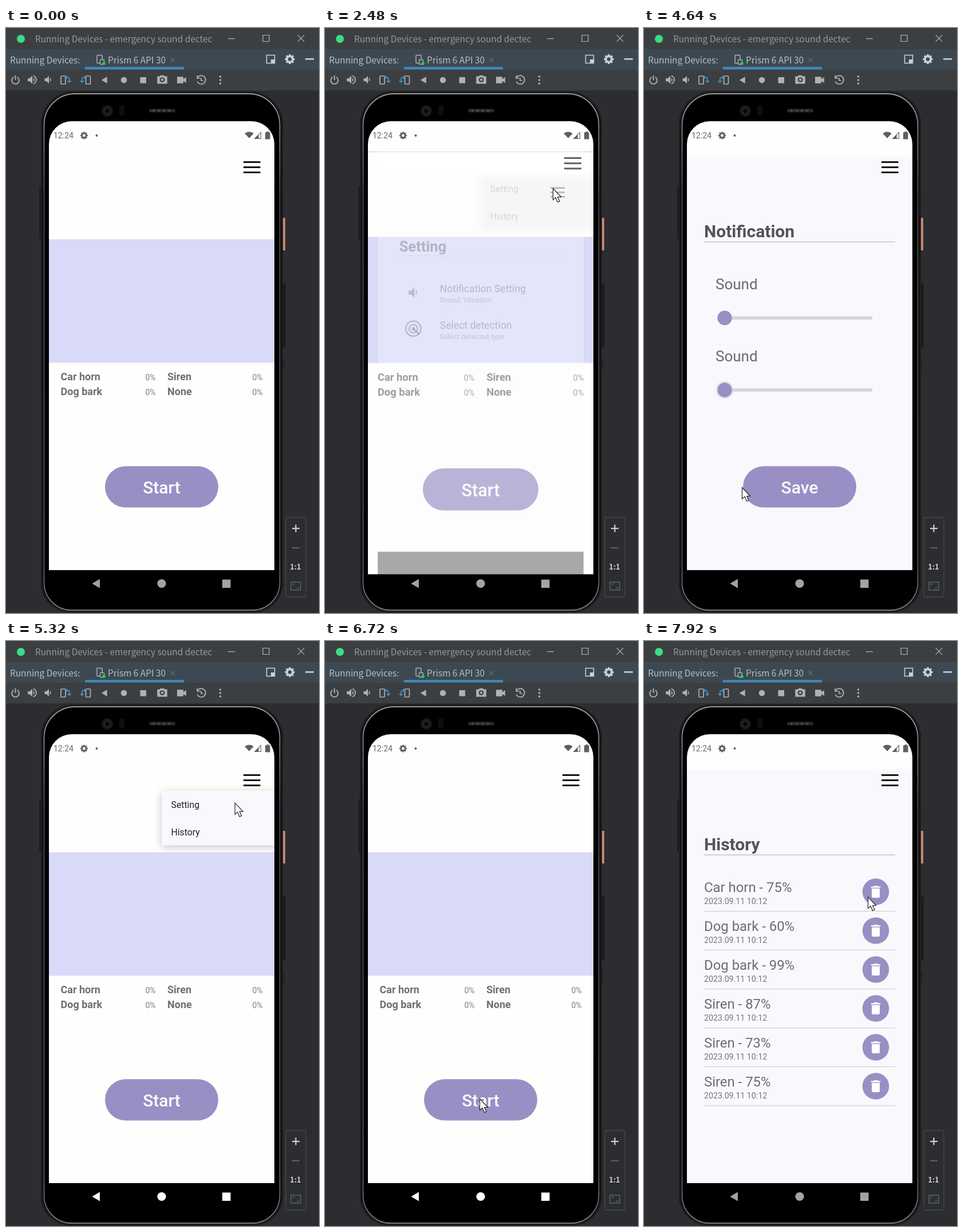
Write an HTML page with a canvas that moves like this. It is 547 by 1023 pixels and loops after 8 s.

```html
<!DOCTYPE html>
<html lang="en">
<head>
<meta charset="utf-8">
<title>Emulator demo</title>
<style>
html, body { margin: 0; width: 100%; height: 100%; overflow: hidden; background: #2b2d30; }
canvas { display: block; }
</style>
</head>
<body>
<canvas id="stage" width="547" height="1023"></canvas>
<script>
const g = document.getElementById('stage').getContext('2d');
const LOOP = 8000, STEP = 40, MORPH = 220;
const PURPLE = '#9a8fc4', ICON = '#afb1b3', BLUE = '#3c95c8', PAGE = '#faf8fc';
const UI = '"Noto Sans CJK KR", "Noto Sans CJK JP", "Noto Sans", sans-serif';
const APP = 'Roboto, sans-serif';
const clamp = v => Math.max(0, Math.min(1, v));
let now = 0, mouse = null;

// Drawing helpers
function rect(x, y, w, h, color) { g.fillStyle = color; g.fillRect(x, y, w, h); }
function round(x, y, w, h, r, fill, line, width = 1) {
  g.beginPath();
  g.roundRect(x, y, w, h, r);
  if (fill) { g.fillStyle = fill; g.fill(); }
  if (line) { g.strokeStyle = line; g.lineWidth = width; g.stroke(); }
}
function disc(x, y, r, fill, line, width = 1) {
  round(x - r, y - r, 2 * r, 2 * r, r, fill, line, width);
}
function text(s, x, y, size, color, weight = 400, family = APP, align = 'left') {
  g.font = `${weight} ${size}px ${family}`;
  g.textAlign = align;
  g.fillStyle = color;
  g.fillText(s, x, y);
}
// Icon paths live on a 24 unit grid centred on x, y.
function icon(d, x, y, size, color, width) {
  g.save();
  g.translate(x - size / 2, y - size / 2);
  g.scale(size / 24, size / 24);
  const path = new Path2D(d);
  if (width) { g.strokeStyle = color; g.lineWidth = width; g.stroke(path); }
  else { g.fillStyle = color; g.fill(path, 'evenodd'); }
  g.restore();
}
function fade(alpha, draw) {
  g.save();
  g.globalAlpha *= alpha;
  draw();
  g.restore();
}
function zoom(s, cy, draw) {
  g.save();
  g.translate(272, cy);
  g.scale(s, s);
  g.translate(-272, -cy);
  draw();
  g.restore();
}
function gear(x, y, r, color) {
  disc(x, y, r * .58, null, color, r * .42);
  g.lineWidth = r * .42;
  g.beginPath();
  for (let i = 0; i < 8; i++) {
    const c = Math.cos(i * Math.PI / 4), s = Math.sin(i * Math.PI / 4);
    g.moveTo(x + c * r * .7, y + s * r * .7);
    g.lineTo(x + c * r, y + s * r);
  }
  g.stroke();
}

const SPEAKER = 'M3 9v6h4l5 5V4L7 9z';
const WAVE = 'M14 8v8a4.5 4.5 0 0 0 0-8z';
const WAVE2 = 'M14 3.2v2.1a7 7 0 0 1 0 13.4v2.1a9 9 0 0 0 0-17.6z';
const BIN = 'M6 19a2 2 0 0 0 2 2h8a2 2 0 0 0 2-2V7H6zM19 4h-3.5l-1-1h-5l-1 1H5v2h14z';
const CROSS = 'M2 2 22 22M22 2 2 22';
const BACK = 'M20 2v20L3 12z';

// Desktop window around the phone
function windowFrame() {
  rect(0, 0, 547, 1023, '#2b2d30');
  rect(0, 0, 547, 109, '#3c3f41');
  rect(0, 37, 547, 36, '#3d4952');
  disc(26, 19, 7, '#3ddc84');
  text('Running Devices - emergency sound dectect', 51, 25, 15.4, '#96999b', 400, UI);
  rect(361, 5, 20, 30, '#3c3f41');
  rect(388, 18, 12, 1.2, '#b4b6b8');
  round(449, 12.5, 11, 11, 0, null, '#b4b6b8', 1.2);
  icon(CROSS, 515.5, 18, 14, '#b4b6b8', 2);

  text('Running Devices:', 7, 62, 15.4, '#bcbec0', 400, UI);
  rect(138, 68, 173, 4.5, '#4088b5');
  round(159, 47.5, 9, 14, 1, null, ICON, 1.5);
  round(164.5, 55.5, 7, 8, 1, '#3d4952', ICON, 1.3);
  disc(171, 62, 2.8, '#21d04b');
  text('Prism 6 API 30', 178, 62, 15.4, '#bcbec0', 400, UI);
  icon(CROSS, 291, 56, 9, '#74797d', 2.8);
  round(455.5, 47.5, 14, 14, 0, null, '#ced0d2', 1.6);
  rect(463, 55, 6, 6, '#ced0d2');
  gear(496, 54.5, 8.5, '#ced0d2');
  rect(523, 53, 15, 2.6, '#ced0d2');

  icon('M7.5 5.5a8.5 8.5 0 1 0 9 0M12 1v11', 16.5, 91, 18, ICON, 2.5);
  icon(SPEAKER + WAVE + WAVE2, 46, 90.5, 21, ICON);
  icon(SPEAKER + WAVE, 75, 90.5, 20, ICON);
  for (const [x, flip] of [[105, 1], [138.5, -1]]) {
    g.save();
    g.translate(x, 91);
    g.scale(flip, 1);
    round(-9, -7, 8, 14, 1, null, ICON, 1.7);
    icon('M4 4h5q6 0 6 6v9M10 14l5 5 5-5M8 0 4 4l4 4', 4, 0, 14, BLUE, 2.8);
    g.restore();
  }
  icon(BACK, 172, 91, 14, ICON);
  disc(206, 91, 5.3, ICON);
  rect(234.5, 86, 10.5, 10.5, ICON);
  icon('M9 3 7 5H2v15h20V5h-5l-2-2zM12 7a5 5 0 1 0 .1 0zM12 9.5a2.5 2.5 0 1 0 .1 0z', 273, 90.5, 21, ICON);
  icon('M3 5h13v5l6-4v12l-6-4v5H3z', 306.5, 91, 20, ICON);
  icon('M4 6a10 10 0 1 1-1 9M3 1v7h7M12 7v6h5', 341, 91, 18, ICON, 2.3);
  for (const y of [85, 91, 97]) disc(374.5, y, 1.8, ICON);

  round(489, 856, 35, 139, 3, '#2b2d30', '#45484a', 1.3);
  rect(500, 874, 13, 2.2, '#ced0d2');
  rect(505.4, 868.5, 2.2, 13, '#ced0d2');
  rect(500, 908, 13, 2, '#606366');
  text('1:1', 506, 947, 13, '#ced0d2', 700, UI, 'center');
  round(498, 969, 17, 14, 0, null, '#606366', 1.5);
  icon('M3 10V4h7M21 14v6h-7', 506.5, 976, 12, '#606366', 2.4);
}

function phoneBody() {
  rect(58, 277, 3, 92, '#1d1e20');
  rect(484, 332, 4, 57, '#c98472');
  rect(484.5, 446, 4, 112, '#191a1b');
  rect(484.5, 580, 2, 18, '#202123');
  const shine = g.createLinearGradient(0, 112, 0, 1020);
  shine.addColorStop(0, '#9a9b9d');
  shine.addColorStop(.1, '#707173');
  shine.addColorStop(.2, '#48494b');
  shine.addColorStop(.9, '#505153');
  shine.addColorStop(1, '#77787a');
  round(61, 111, 423, 911, [58, 58, 52, 52], '#050506');
  round(62.5, 112.5, 420, 908, [57, 57, 51, 51], null, '#1e1f21', 2.5);
  round(66.5, 115, 412, 903, [54, 54, 48, 48], '#000', shine, 2);
  disc(177, 145, 10, '#17181a');
  disc(177, 145, 5, '#08080a', '#2e2f32', 1.5);
  round(198, 135, 9, 18, 3, '#0e0e10');
  round(250, 141.5, 46, 6, 3, '#2a2a2c');
  for (let x = 258; x < 294; x += 9) disc(x, 144.5, 2, '#4a4a4c');
}

// App screens
function button(label, y = 766.2, h = 72.3) {
  round(173, y, 198, h, h / 2, PURPLE);
  text(label, 272, y + h / 2 + 11.5, 30, '#fff', 500, APP, 'center');
}
function heading(s, y = 374) {
  text(s, 105, y - 8.5, 30, '#555356', 700);
  rect(105, y - .7, 334, 1.4, '#c3c1c5');
}
function home() {
  rect(75, 369.5, 394, 216, '#d9daf8');
  ['Car horn', 'Siren', 'Dog bark', 'None'].forEach((name, i) => {
    const col = i % 2, y = 616 + (i >> 1) * 26;
    text(name, col ? 282 : 95.5, y, 18, '#6f6f70', 700);
    text('0%', col ? 448.5 : 261.5, y, 14, '#828283', 400, APP, 'right');
  });
  button('Start');
}
function setting() {
  heading('Setting');
  icon(SPEAKER + WAVE, 136, 449, 32, '#6f6d72');
  disc(134, 523, 15.5, null, '#6f6d72', 3);
  disc(134, 523, 8.5, null, '#6f6d72', 3);
  disc(134, 523, 3.5, '#6f6d72');
  icon('M12 12l9 9', 134, 523, 32, '#6f6d72', 2.4);
  text('Notification Setting', 188.5, 448, 20.6, '#636165');
  text('Sound, Vibration', 188.5, 469, 14.6, '#858388');
  text('Select detection', 188.5, 523, 20.6, '#636165');
  text('Select detected type', 188.5, 544, 14.6, '#858388');
}
function notification() {
  heading('Notification');
  for (const [y, from, to] of [[507, 3640, 4040], [633, 4180, 4480]]) {
    const held = now >= from && now <= to;
    const x = held ? Math.max(141, Math.min(387, mouse[0])) : 141;
    text('Sound', 125, y - 50, 26, '#6b696d');
    rect(141, y - 2.8, 258, 5.6, '#d7d5d9');
    rect(141, y - 2.8, x - 141, 5.6, PURPLE);
    if (now >= from) fade(clamp(1 - (now - to) / 320), () => disc(x, y, 15.5, '#d4d1da'));
    disc(x, y, 12.7, PURPLE);
  }
  button('Save');
}
function detection() {
  heading('Detecting type', 371.5);
  ['Car horn', 'Dog bark', 'Siren'].forEach((name, i) => {
    const y = 454 + i * 70.5;
    text(name, 125, y + 11, 27.7, '#565458');
    if (i < 2 || now < 6080) {
      round(390, y - 12.8, 25, 25, 2, null, PURPLE, 2.8);
      return;
    }
    fade(clamp((6360 - now) / 160), () => disc(403, y, 30, '#e0ebe9'));
    round(390, y - 12.8, 25, 25, 2, PURPLE);
    if (now < 6200) disc(402.5, y, 1.4, '#fff');
    else icon('M3 12l6 6L21 6', 402.5, y, 21, '#fff', 3);
  });
  button('Save', 771, 70);
}
function history() {
  heading('History');
  ['Car horn - 75%', 'Dog bark - 60%', 'Dog bark - 99%', 'Siren - 87%', 'Siren - 73%', 'Siren - 75%'].forEach((name, i) => {
    const y = 438.5 + i * 68;
    text(name, 105, y, 23.9, '#6f6d71');
    text('2023.09.11 10:12', 105, y + 21.5, 14.2, '#77757a');
    rect(105, y + 33.4, 334, 1.3, '#d3d1d5');
    disc(405, y, 23.3, PURPLE);
    icon(BIN, 405, y, 28, '#fff');
  });
}

function layer(page, back, front = back, cy = 579.5) {
  zoom(back, 579.5, () => {
    rect(75, 163, 394, 61, '#fffefd');
    rect(75, 224, 394, 724, page === home ? '#fffefd' : PAGE);
    rect(75, 948, 394, 48, '#000');
  });
  zoom(front, cy, () => {
    page();
    for (const y of [233, 242, 251]) rect(415, y, 29.5, 3, '#151515');
  });
}

// Start time, screen below, screen above, whether the upper one closes
const morphs = [
  [2420, home, setting], [3080, setting, notification], [4800, home, notification, true],
  [5400, home, setting], [5680, setting, detection], [6340, home, detection, true],
  [7420, home, history]
];
function screens() {
  const last = morphs.filter(m => m[0] <= now).pop();
  if (!last) return layer(home, 1);
  const [start, below, above, closing] = last;
  const p = clamp((now - start) / MORPH), open = closing ? 1 - p : p;
  if (open < 1) layer(below, 1 + .075 * open);
  if (open > 0) fade(clamp(1.25 * open), () => layer(above, .88 + .12 * open, .797 + .203 * open, 541));
}

function popup() {
  for (const [from, to] of [[1440, 2495], [5180, 5460], [6960, 7480]]) {
    if (now < from || now >= to) continue;
    const out = clamp((to - now) / 100);
    fade(clamp((now - from + 40) / 120) * out, () => {
      g.translate(0, -6 * (1 - out));
      g.shadowColor = 'rgba(0,0,0,.22)';
      g.shadowBlur = 14;
      g.shadowOffsetY = 3;
      round(272, 261.5, 220, 96, 3, PAGE);
      g.shadowColor = 'transparent';
      text('Setting', 288.5, 292, 15.8, '#222');
      text('History', 288.5, 340, 15.8, '#222');
    });
  }
}

function systemBars() {
  text('12:24', 83, 193, 14, '#69696a');
  gear(136.5, 188, 6.5, '#5f5f60');
  disc(158.5, 188, 2, '#5f5f60');
  icon('M12 21 0 8a18 18 0 0 1 24 0z', 425, 187, 15.5, '#5f5f60');
  icon('M22 2v20H2z', 440, 188, 13, '#5f5f60', 2);
  icon('M15 9v13H2z', 440, 188, 13, '#5f5f60');
  rect(453, 182.5, 8.5, 12, '#5f5f60');
  rect(455.5, 181, 3.5, 2, '#5f5f60');
  const bright = now >= 4840 && now < 5440 || now >= 6400 && now < 7480;
  const nav = bright ? '#fff' : '#a3a3a3';
  icon(BACK, 157.6, 971.5, 19, nav);
  disc(272, 971.5, 7.6, nav);
  rect(378, 964.5, 14.5, 14.5, nav);
}

// Pointer stops: time, x, y
const stops = [
  [40, 525, 797], [360, 501, 392], [640, 501, 392], [1120, 428, 243], [1440, 428, 243],
  [2240, 398, 280], [2840, 398, 280], [3040, 300, 455], [3160, 300, 455], [3480, 245, 500],
  [3640, 141, 506], [3840, 250, 508], [4040, 141, 507], [4180, 141, 632], [4320, 250, 634],
  [4480, 141, 632], [4640, 171, 803], [4720, 240, 805], [4840, 240, 805], [5120, 428, 243],
  [5200, 428, 243], [5340, 398, 285], [5420, 398, 285], [5600, 300, 520], [5700, 300, 520],
  [6040, 403, 594], [6100, 403, 594], [6160, 388, 630], [6320, 270, 800], [6720, 270, 800],
  [6900, 428, 243], [6980, 428, 243], [7200, 387, 317], [7340, 340, 332], [7520, 340, 332],
  [7920, 391, 447]
];
function pointerAt(t) {
  if (t < stops[0][0]) return null;
  const i = stops.findIndex(s => s[0] > t);
  if (i < 0) return stops[stops.length - 1].slice(1);
  const [t0, x0, y0] = stops[i - 1], [t1, x1, y1] = stops[i];
  const p = (t - t0) / (t1 - t0), e = p * p * (3 - 2 * p);
  return [x0 + (x1 - x0) * e, y0 + (y1 - y0) * e];
}
function pointer() {
  if (!mouse) return;
  g.save();
  g.translate(...mouse);
  const arrow = new Path2D('M.5.5V20.5L5 16.5 8.5 24.5 12 23 8.5 15.5H14.5z');
  g.fillStyle = '#fff';
  g.fill(arrow);
  g.strokeStyle = '#222';
  g.lineWidth = 1.2;
  g.stroke(arrow);
  g.restore();
}

function frame() {
  now = Math.floor(performance.now() % LOOP / STEP) * STEP;
  mouse = pointerAt(now);
  windowFrame();
  phoneBody();
  g.save();
  g.beginPath();
  g.roundRect(75, 163, 394, 833, [40, 40, 0, 0]);
  g.clip();
  screens();
  popup();
  systemBars();
  g.restore();
  pointer();
  requestAnimationFrame(frame);
}
frame();
</script>
</body>
</html>
```
